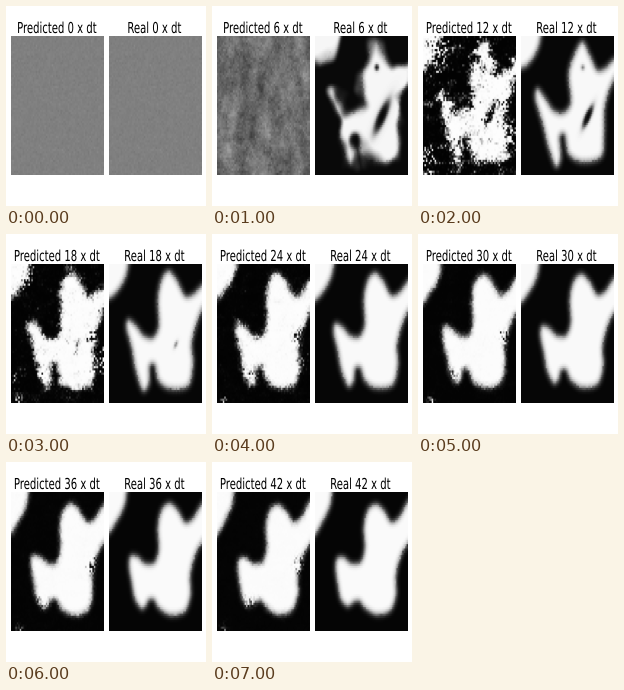
Animation of 200x200 px, one loop 8 s. Source, as a matplotlib script:

```python
import numpy as np
import matplotlib.pyplot as plt
from matplotlib.animation import FuncAnimation
from matplotlib.patches import PathPatch
from matplotlib.path import Path
from matplotlib.textpath import TextPath
from matplotlib.transforms import Affine2D

SIZE = 200
CELLS = 64
STEP = 6
FRAMES = 8
SQUEEZE = 2 / 3          # the square panels and the type share one narrow aspect
TOP, BOTTOM = 30.6, 169.4
WIDTH = 92.5
LEFT_PANEL, RIGHT_PANEL = 5, 102.5

# Outline of the large phase at three times, in stage pixels of the right panel.
BODY_EARLY = [
    (206, 48), (195, 54), (186, 63), (178, 64), (171, 50), (164, 37), (157, 46),
    (150, 68), (152, 96), (145, 107), (135, 105), (126, 92), (119, 84), (117, 94),
    (124, 118), (130, 142), (137, 160), (142, 152), (141, 132), (146, 130),
    (150, 148), (163, 156), (182, 151), (185, 128), (186, 100), (194, 76), (206, 58)]
BODY_MID = [
    (206, 42), (195, 52), (186, 61), (178, 62), (170, 47), (162, 38), (155, 46),
    (151, 66), (152, 92), (146, 104), (137, 102), (129, 92), (122, 87), (120, 95),
    (125, 114), (129, 136), (136, 156), (142, 150), (143, 133), (148, 132),
    (152, 147), (163, 155), (181, 152), (186, 130), (185, 108), (194, 78), (206, 60)]
BODY_LATE = [
    (206, 30), (195, 40), (186, 56), (178, 60), (171, 49), (163, 43), (155, 49),
    (151, 66), (152, 86), (148, 100), (139, 102), (131, 96), (125, 97), (123, 106),
    (125, 122), (128, 137), (134, 144), (138, 143), (142, 140), (147, 140),
    (153, 147), (164, 153), (177, 149), (183, 134), (183, 114), (189, 92), (206, 62)]
CORNER_EARLY = [(90, 10), (124, 10), (122, 32), (118, 46), (110, 58), (102, 63), (90, 66)]
CORNER_LATE = [(90, 10), (119, 10), (119, 35), (116, 48), (109, 62), (102, 74), (90, 84)]

# x, y, radius, noise at t = 12, noise at t = 42, bias towards white
SPOTS = [(182, 103, 8, 9, 7, 0), (134, 139, 7, 7, 5, 0), (110, 168, 8, 6, 4, 9),
         (107, 148, 12, 10, -15, 1), (192, 128, 14, 11, -8, 2), (119, 46, 14, 11, -14, 1)]

cell = (np.arange(CELLS) + 0.5) / CELLS
GX, GY = np.meshgrid(RIGHT_PANEL + cell * WIDTH, TOP + cell * (BOTTOM - TOP))
GRID = np.column_stack([GX.ravel() / SQUEEZE, GY.ravel()])


def closed_curve(points, steps=8):
    """Catmull-Rom curve through the points."""
    p = np.asarray(points, float)
    a, c, d = np.roll(p, 1, 0), np.roll(p, -1, 0), np.roll(p, -2, 0)
    u = np.linspace(0, 1, steps, endpoint=False)[:, None, None]
    curve = 0.5 * (2 * p + (c - a) * u + (2 * a - 5 * p + 4 * c - d) * u ** 2
                   + (3 * p - a - 3 * c + d) * u ** 3)
    return curve.transpose(1, 0, 2).reshape(-1, 2)


def signed_distance(points):
    """Distance to the outline, positive inside."""
    curve = closed_curve(points) / [SQUEEZE, 1]
    dist = np.sqrt(((GRID[:, None] - curve[None]) ** 2).sum(2).min(1))
    inside = Path(curve).contains_points(GRID)
    return np.where(inside, dist, -dist).reshape(CELLS, CELLS)


def blend(a, b, k):
    return np.asarray(a) * (1 - k) + np.asarray(b) * k


def smooth_noise(rng, sx, sy):
    """Periodic noise blurred by sx, sy cells, with unit deviation."""
    fx, fy = np.meshgrid(np.fft.fftfreq(CELLS), np.fft.fftfreq(CELLS))
    blur = np.exp(-2 * np.pi ** 2 * ((sx * fx) ** 2 + (sy * fy) ** 2))
    field = np.fft.ifft2(np.fft.fft2(rng.normal(size=GX.shape)) * blur).real
    field -= field.mean()
    return field / field.std()


def bump(x, y, long, short, angle=0.0):
    dx, dy = (GX - x) / SQUEEZE, GY - y
    c, s = np.cos(angle), np.sin(angle)
    return np.exp(-((dx * c + dy * s) / long) ** 2 - ((dy * c - dx * s) / short) ** 2)


def phase(t):
    """Signed distance field of the white phase at time t."""
    if t < 18:
        body = blend(BODY_EARLY, BODY_MID, np.clip((t - 12) / 6, 0, 1))
    else:
        body = blend(BODY_MID, BODY_LATE, ((t - 18) / 24) ** 0.75)
    corner = blend(CORNER_EARLY, CORNER_LATE, np.clip((t - 12) / 30, 0, 1))
    field = np.maximum(signed_distance(body), signed_distance(corner))
    if t < 12:
        rng = np.random.default_rng(4)
        field += 3.5 * smooth_noise(rng, 3, 3)
        field += 12 * bump(124, 40, 9, 14) + 10 * bump(190, 72, 12, 12)
    field = np.clip(field, -8, 8)
    times = (6, 12, 18, 24)
    long, short, depth, dot = (
        np.interp(t, times, v)
        for v in ((23, 16, 6, 4), (7, 5, 3, 2), (16, 15, 8, 0), (13, 8, 0, 0)))
    field -= depth * bump(169, 111, long, short, np.radians(-56))
    return field - dot * bump(164, 62, 4, 4)


def tone(field, width):
    return 0.5 + 0.49 * np.tanh(field / width)


def real(t):
    if t == 0:
        return 0.5 + 0.01 * np.random.default_rng(1).normal(size=GX.shape)
    return tone(phase(t), np.interp(t, (6, 12, 42), (4.5, 4, 3.6)))


def predicted(t):
    if t == 0:
        return real(0)
    rng = np.random.default_rng(20 + t)
    if t == STEP:
        return (0.43 + 0.045 * smooth_noise(rng, 2.5, 5) + 0.025 * smooth_noise(rng, 1, 1)
                + 0.03 * rng.normal(size=GX.shape) + 0.02 * np.tanh(phase(t) / 5))
    field = phase(t)
    rough = np.interp(t, (12, 18, 30, 42), (2.8, 1.6, 0.6, 0.35))
    field += rough * (rng.normal(size=GX.shape) + 0.8 * smooth_noise(rng, 2, 1))
    for x, y, r, start, end, bias in SPOTS:
        level = max(0, np.interp(t, (12, 42), (start, end)))
        field += bump(x, y, r, r) * level * (rng.normal(size=GX.shape) + bias / 9)
    return tone(field, np.interp(t, (12, 42), (2.6, 3.2)))


def enlarge(cells):
    return np.kron(np.clip(cells, 0, 1), np.ones((6, 6)))


def title_path(text, center):
    path = TextPath((0, 0), text, size=15.1, prop="DejaVu Sans")
    box = path.get_extents()
    place = (Affine2D().translate(-(box.x0 + box.x1) / 2, 0)
             .scale(SQUEEZE, -1).translate(center, 27))
    return place.transform_path(path)


PANELS = [("Predicted", LEFT_PANEL, predicted), ("Real", RIGHT_PANEL, real)]

fig = plt.figure(figsize=(2, 2), dpi=100, facecolor="white")
ax = fig.add_axes([0, 0, 1, 1])
ax.axis("off")

views = []
for name, left, source in PANELS:
    shots = [enlarge(source(i * STEP)) for i in range(FRAMES)]
    image = ax.imshow(shots[0], cmap="gray", vmin=0, vmax=1, aspect="auto",
                      extent=(left, left + WIDTH, BOTTOM, TOP))
    center = left + WIDTH / 2
    title = PathPatch(title_path(f"{name} 0 x dt", center), fc="black", lw=0)
    ax.add_patch(title)
    views.append((name, center, shots, image, title))
ax.set_xlim(0, SIZE)
ax.set_ylim(SIZE, 0)


def update(i):
    for name, center, shots, image, title in views:
        image.set_data(shots[i])
        title.set_path(title_path(f"{name} {i * STEP} x dt", center))
    return [artist for view in views for artist in view[3:]]


anim = FuncAnimation(fig, update, frames=FRAMES, interval=1000, repeat=True)
plt.show()
```
